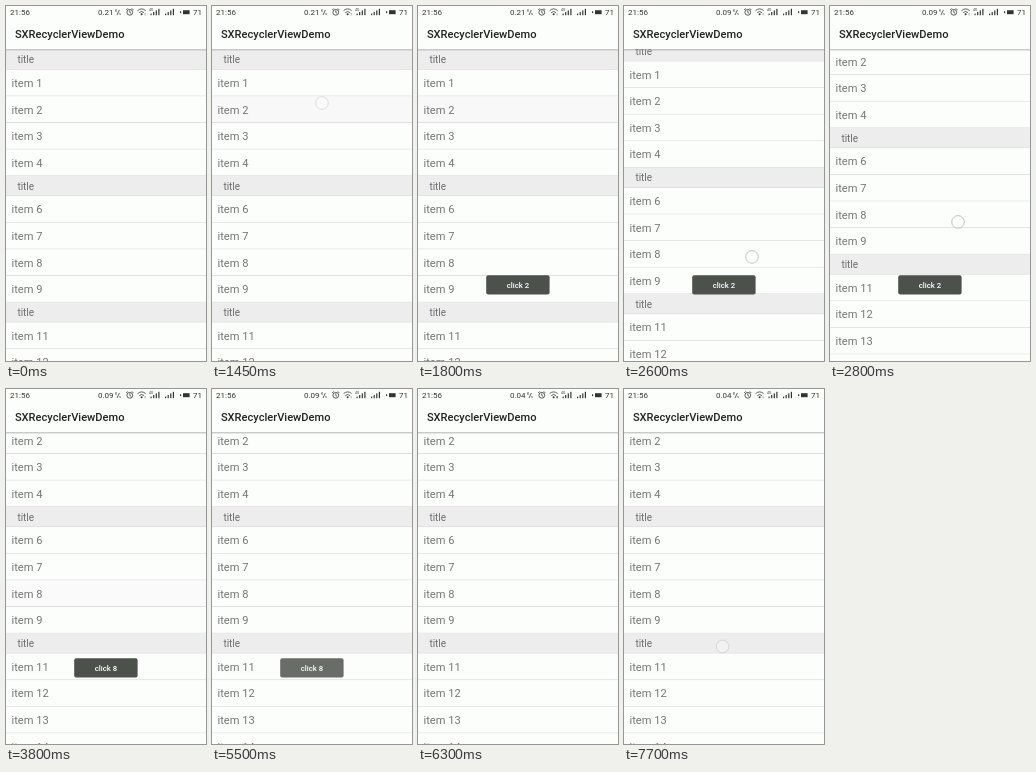
Write an HTML page that moves like this. It is 200 by 355 pixels and loops after 8000 ms.

```html
<!DOCTYPE html>
<html lang="en">
<head>
<meta charset="utf-8">
<title>Recycler list</title>
<style>
  html, body { margin: 0; width: 100%; height: 100%; overflow: hidden; background: #fcfefc; }
  svg { display: block; width: 100%; height: 100%; font-family: Roboto, sans-serif; }
  .item { font-size: 11.1px; fill: #757575; }
  .head { font-size: 10px; fill: #6c6c6c; }
  .bar { font-size: 8px; fill: #333; }
  .line { fill: none; stroke: #333; stroke-width: .8; }
  .toast rect { fill: #4c514c; }
  .toast text { font-size: 7.78px; font-weight: 500; fill: #fff; text-anchor: middle; }
</style>
</head>
<body>
<svg viewBox="0 0 200 355">
  <defs>
    <linearGradient id="shade" x2="0" y2="1">
      <stop offset="0" stop-color="#999" stop-opacity=".65"/>
      <stop offset="1" stop-color="#999" stop-opacity="0"/>
    </linearGradient>
  </defs>
  <g id="list"></g>

  <rect width="200" height="43" fill="#fcfefc"/>
  <rect y="43" width="200" height="2.4" fill="url(#shade)"/>
  <text x="8.9" y="31.8" font-size="11.1" font-weight="500" fill="#222">SXRecyclerViewDemo</text>

  <g class="bar" id="bar">
    <text x="4" y="9">21:56</text>
    <text id="rate" x="92" y="9"></text>
    <text x="109" y="6" font-size="3.6">K</text>
    <text x="113" y="9" font-size="4">s</text>
    <path class="line" d="M111 9l2.4-5"/>
    <g class="line">
      <circle cx="123.8" cy="6.3" r="2.9"/>
      <path d="M123.8 4.4v2.1l1.4.8M120.2 4l1.6-1.6M127.4 4l-1.6-1.6"/>
      <path d="M131.6 4.6q4-3.4 8 0M133.2 6.6q2.4-2.2 4.8 0"/>
    </g>
    <circle cx="135.6" cy="8.3" r="1"/>
    <rect id="arrow" x="138.4" y="7" width="1.4" height="2.4"/>
    <text x="143" y="5.4" font-size="3.4">4G</text>
    <rect x="174" y="5.3" width="1.2" height="1.8"/>
    <rect x="177" y="4.2" width="6.6" height="4"/>
    <text x="187" y="9">71</text>
  </g>

  <g class="toast" id="toast2"><rect x="68.2" y="269.2" width="63.4" height="19.4" rx="2"/><text x="100" y="281.7">click 2</text></g>
  <g class="toast" id="toast8"><rect x="68.2" y="269.2" width="63.4" height="19.4" rx="2"/><text x="100" y="281.7">click 8</text></g>
  <circle id="touch" r="6.3" fill="#fff" fill-opacity=".5" stroke="#bbb" stroke-width=".9"/>
</svg>
<script>
const LOOP = 8000, STEP = 50, FADE = 300;
const LIST_TOP = 43.8, HEAD = 20, ITEM = 26.6;
const $ = id => document.getElementById(id);

function set(el, attrs) {
  for (const k in attrs) el.setAttribute(k, attrs[k]);
  return el;
}

function add(parent, tag, attrs, text = '') {
  const el = document.createElementNS('http://www.w3.org/2000/svg', tag);
  el.textContent = text;
  return $(parent).appendChild(set(el, attrs));
}

// Status bar: two signal meters
for (const left of [144.5, 159])
  for (let i = 0; i < 4; i++) {
    const height = 1.6 + 1.6 * i;
    add('bar', 'rect', { x: left + 2.6 * i, y: 9.2 - height, width: 1.2, height });
  }

// List: a title, then four items, repeating
const rows = [];
for (let i = 0, y = LIST_TOP; i < 16; i++) {
  const head = i % 5 === 0, height = head ? HEAD : ITEM;
  rows[i] = add('list', 'rect', { y, width: 200, height, fill: head ? '#ededed' : '#fcfefc' });
  add('list', 'rect', { y: y + height - .8, width: 200, height: .8, fill: '#d9dad9' });
  add('list', 'text', {
    class: head ? 'head' : 'item',
    x: head ? 11.4 : 5.5,
    y: y + height / 2 + (head ? 3.4 : 3.8)
  }, head ? 'title' : 'item ' + i);
  y += height;
}

const ramp = (t, start, length) => Math.min(1, Math.max(0, (t - start) / length));
const smooth = p => p * p * (3 - 2 * p);
const pulse = (t, start, end, length) => ramp(t, start, length) - ramp(t, end, length);
const within = (t, start, end) => t >= start && t < end;

function draw(t) {
  const drag = smooth(ramp(t, 2512, 348));
  set($('list'), { transform: `translate(0 ${-52 * drag})` });
  set(rows[2], { fill: within(t, 1450, 2500) ? '#f7f8f7' : '#fcfefc' });
  set(rows[8], { fill: within(t, 3250, 5500) ? '#f9faf9' : '#fcfefc' });

  $('rate').textContent = t < 2500 ? '0.21' : t < 5900 ? '0.09' : '0.04';
  set($('arrow'), { opacity: within(t, 6300, 7250) ? .8 : .3 });
  set($('toast2'), { opacity: pulse(t, 1500, 3400, FADE) });
  set($('toast8'), { opacity: pulse(t, 3500, 5450, FADE) });

  const touches = [
    { start: 1400, end: 1600, x: 110, y: 97 },
    { start: 2500, end: 2950, x: 128, y: 258.3 - 46 * drag },
    { start: 3200, end: 3400, x: 141, y: 205 },
    { start: 7500, end: LOOP + 200, x: 98.5, y: 257.5, peak: .5 }
  ];
  const hit = touches.find(({ start, end }) => within(t, start, end));
  if (!hit) return set($('touch'), { opacity: 0 });
  const { start, end, x, y, peak = 1 } = hit;
  set($('touch'), { cx: x, cy: y, opacity: peak * pulse(t, start, end - 100, 100) });
}

const begin = performance.now();
function tick() {
  const t = (performance.now() - begin) % LOOP;
  draw(Math.floor(t / STEP) * STEP);
  requestAnimationFrame(tick);
}
tick();
</script>
</body>
</html>
```
